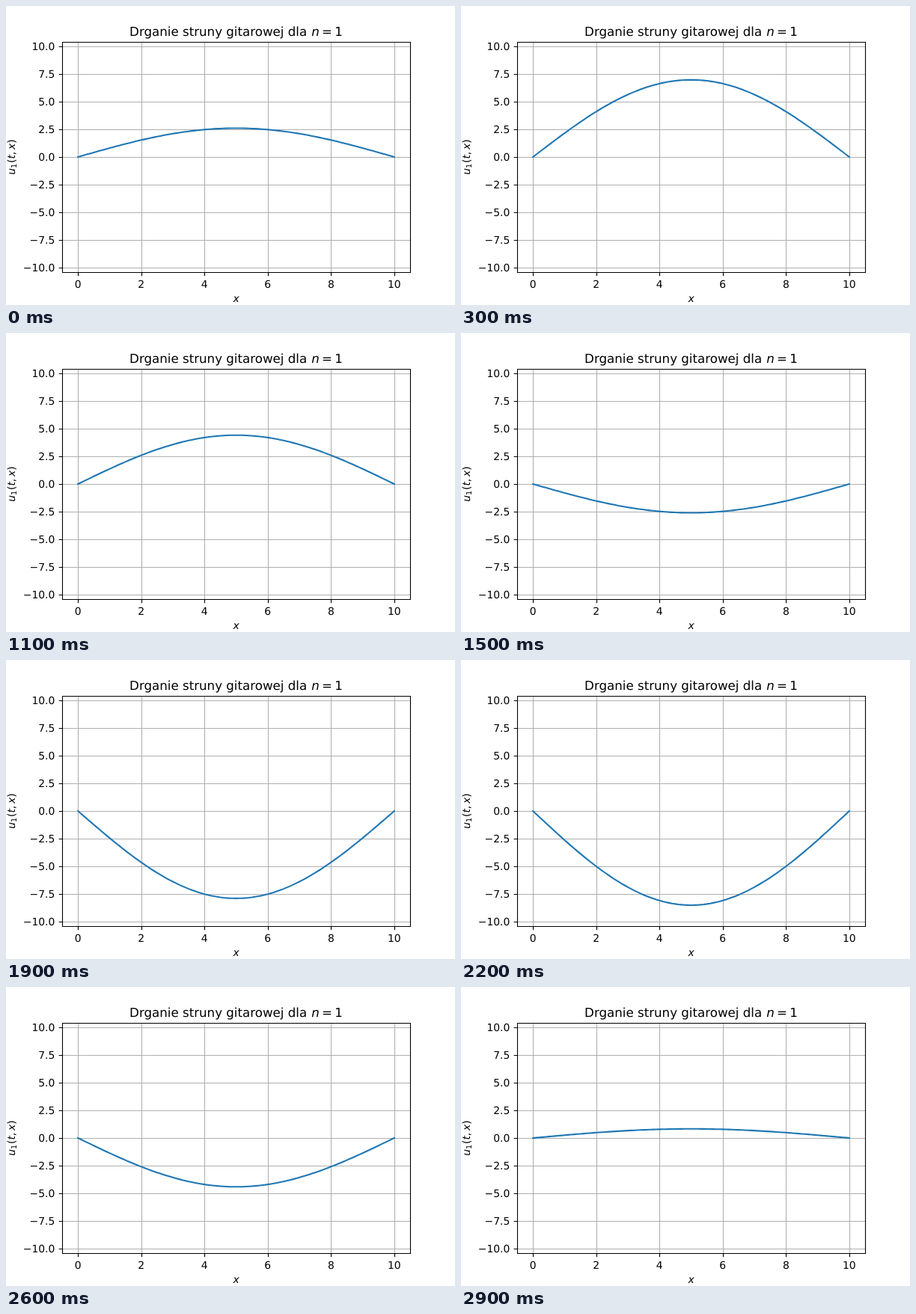
Animation, 600 px wide and 400 px high, one loop 3 s. Source, as an HTML page:

```html
<!DOCTYPE html>
<html lang="pl">
<head>
<meta charset="utf-8">
<title>Drganie struny</title>
<style>
  html, body { margin: 0; width: 100%; height: 100%; overflow: hidden; background: #fff; }
  svg { display: block; width: 600px; height: 400px; }
  text { font: 13.889px "DejaVu Sans", sans-serif; text-rendering: geometricPrecision; }
  .title { font-size: 16.667px; }
  .sub { font-size: 9.722px; }
  .it { font-style: italic; }
  path { fill: none; stroke: #000; stroke-width: 1.111; }
  #grid { stroke: #b0b0b0; }
  #string { stroke: #1f77b4; stroke-width: 2.083; stroke-linecap: square; stroke-linejoin: round; }
</style>
</head>
<body>
<svg viewBox="0 0 600 400">
  <path id="grid"/>
  <path id="ticks"/>
  <path id="string"/>
  <path d="M75.5 48.5H540.5V356.5H75.5Z"/>
  <g id="labels"></g>
  <text class="title" y="40"><tspan x="165.1">Drganie struny gitarowej dla</tspan><tspan class="it" x="408.3">n</tspan><tspan x="422.1">=</tspan><tspan x="439.3">1</tspan></text>
  <text class="it" x="307.5" y="396" text-anchor="middle">x</text>
  <text transform="translate(12 225.7) rotate(-90)"><tspan class="it" x="0">u</tspan><tspan class="sub" x="8.8" y="2.3">1</tspan><tspan x="15.7" y="0">(</tspan><tspan class="it" x="21.1">t</tspan><tspan x="26.5">,</tspan><tspan class="it" x="33.7">x</tspan><tspan x="41.9">)</tspan></text>
</svg>
<script>
  const $ = id => document.getElementById(id);
  const px = x => 75 + 465 * (x + 0.5) / 11;
  const py = y => 202 - 14.82 * y;
  const snap = v => Math.floor(v + 0.5) + 0.5;

  function label(text, x, y, anchor) {
    const el = document.createElementNS($('labels').namespaceURI, 'text');
    el.setAttribute('x', x);
    el.setAttribute('y', y);
    el.setAttribute('text-anchor', anchor);
    el.textContent = text;
    $('labels').append(el);
  }

  let grid = '', ticks = '';
  for (let x = 0; x <= 10; x += 2) {
    const sx = snap(px(x));
    grid += `M${sx} 48V356`;
    ticks += `M${sx} 356.5v4.86`;
    label(x, px(x), 377, 'middle');
  }
  for (let y = -10; y <= 10; y += 2.5) {
    const sy = snap(py(y));
    grid += `M75 ${sy}H540`;
    ticks += `M75.5 ${sy}h-4.86`;
    label(y.toFixed(1).replace('-', '\u2212'), 65.3, Math.round(py(y) + 5.1), 'end');
  }
  $('grid').setAttribute('d', grid);
  $('ticks').setAttribute('d', ticks);

  // First standing mode, 30 steps of 100 ms per period
  function draw() {
    const step = Math.floor(performance.now() / 100) % 30;
    const phase = step * Math.PI / 15;
    const amp = 2.6 * Math.cos(phase) + 8.27 * Math.sin(phase);
    const points = [];
    for (let i = 0; i <= 100; i++) {
      const y = amp * Math.sin(Math.PI * i / 100);
      points.push(px(i / 10).toFixed(2) + ' ' + py(y).toFixed(2));
    }
    $('string').setAttribute('d', 'M' + points.join('L'));
    requestAnimationFrame(draw);
  }
  draw();
</script>
</body>
</html>
```
